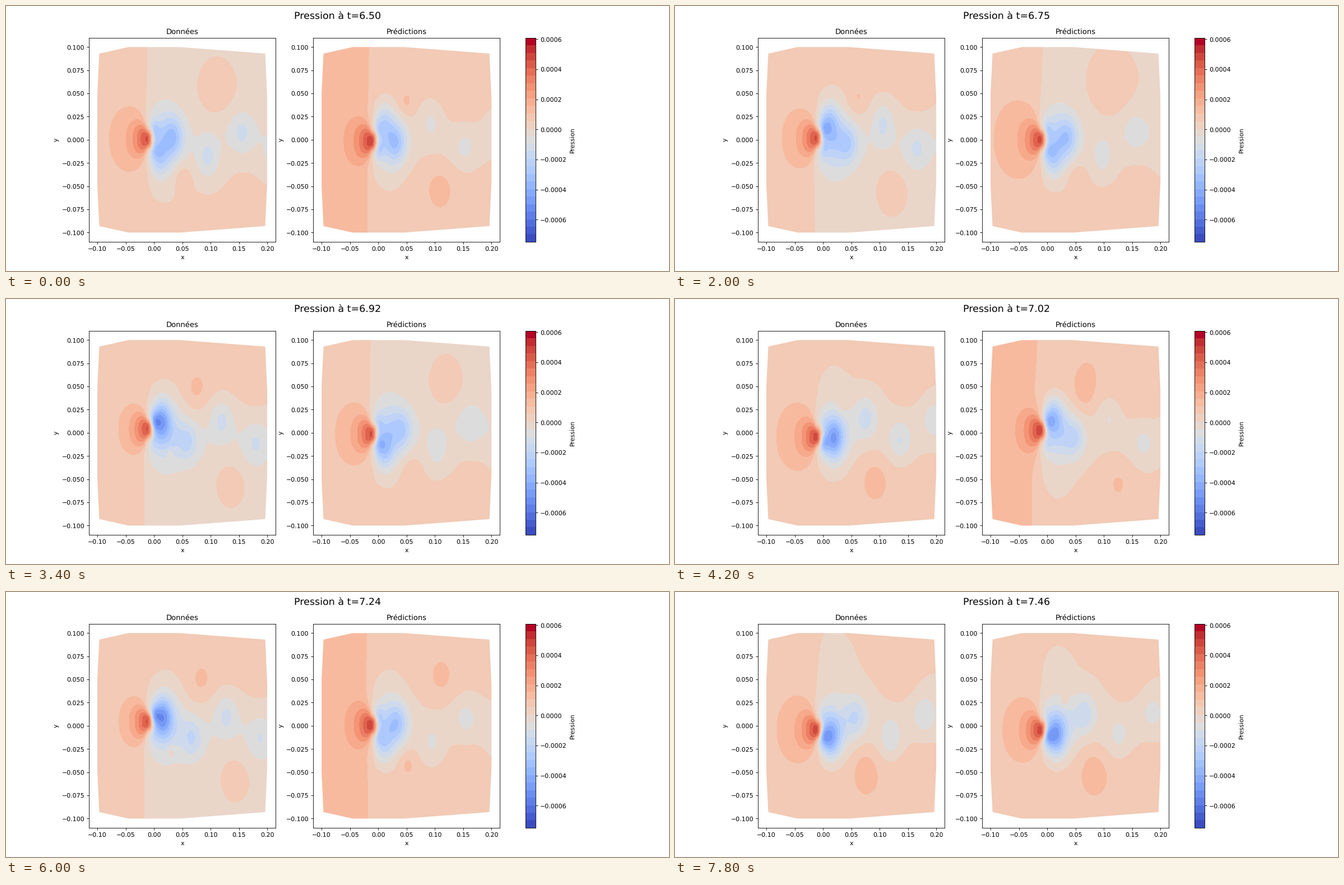
Recreate the animation shown at these times as a matplotlib script. Size 1183x473 px, loop 8 s.

```python
import numpy as np
import matplotlib.pyplot as plt
from matplotlib.animation import FuncAnimation
from matplotlib.cm import ScalarMappable
from matplotlib.colors import Normalize
from matplotlib.patches import Polygon

W, H, DPI = 1183, 473, 78.87
FRAMES, STEP_MS = 40, 200
KEYS = [0, 5, 10, 17, 21, 30, 39]

# Pressures are handled in units of 1e-5, lengths in plot units.
LOW, HIGH = -74.8, 61.0
LEVELS = np.linspace(LOW, HIGH, 20)
X, Y = np.meshgrid(np.linspace(-0.1, 0.2, 241), np.linspace(-0.1, 0.1, 221))

HALF_HULL = [(-0.1, 0.05), (-0.0966, 0.093), (-0.045, 0.1),
             (0.046, 0.1), (0.1965, 0.093), (0.2, 0.045)]
HULL = HALF_HULL + [(x, -y) for x, y in HALF_HULL[::-1]]


def gauss(x, y, sx, sy):
    return np.exp(-((X - x) / sx) ** 2 / 2 - ((Y - y) / sy) ** 2 / 2)


def step(d, width):
    return 0.5 + 0.5 * np.tanh(d / width / 2)


def front(phase):
    """High pressure ahead of the cylinder, in circles through its nose."""
    y0 = -0.0045 * np.sin(2 * np.pi * (phase - 0.03))
    u = -0.012 - X
    up, down = np.maximum(u, 0), np.minimum(u, 0)
    v = 1.08 * (np.hypot(Y - y0, 0.003) - 0.003)
    d = (up ** 2 + v ** 2) / (up + 0.0028)
    return 48 * np.exp(-d / 0.0215 - (down / 0.008) ** 2)


def vortex(age, side, far):
    """One shed vortex; age counts shedding periods, side is +1 above."""
    # It lingers behind the cylinder, then drifts off at a constant speed.
    x = 0.01 + 0.12 * 0.07 * np.log1p(np.exp((age - 0.29) / 0.07))
    y = side * (0.011 + 0.009 * np.cos(2 * np.pi * age) * np.exp(-age ** 2 / 3))
    birth = step(age + 0.1, 0.03)
    fade = np.interp(age, [0.8, 1], [1, far])
    core = 18 * np.exp(-((age - 0.25) / 0.18) ** 2)
    core += 16 * np.exp(-(age / 1.7) ** 2)
    z = -birth * fade * core * gauss(x, y, 0.012, 0.0145)
    # A wide trough pushes the edge of the wake outwards.
    z -= 5 * step(age - 0.6, 0.05) * gauss(x, 1.8 * y, 0.022, 0.017)
    # A ridge of higher pressure travels on the opposite side.
    if age > 0.2:
        ridge = 6.5 * step(1.35 - age, 0.06)
        size = 0.02 * min(age, 1)
        y_ridge = -side * 0.06 * (1 - np.exp(-age / 0.45))
        z += ridge * gauss(x + 0.016, y_ridge, size, size)
    return z


def wake(phase, far):
    phase %= 1
    swing = np.sin(2 * np.pi * (phase - 0.05))
    z = -16 * gauss(0.02, -0.006 * swing, 0.02, 0.021)
    for side in (1, -1):
        z -= (11 - 8 * side * swing) * gauss(0.001, side * 0.012, 0.006, 0.007)
        first = (phase + (0.5 if side > 0 else 0) + 0.3) % 1 - 0.3
        for k in range(3):
            z += vortex(first + k, side, far)
    # The cylinder's rounded back limits the wake.
    return z * step(X + 0.009 - 0.007 * np.exp(-(Y / 0.01) ** 2), 0.0016)


def outer(phase, mean):
    """Slow field: sides rocking in antiphase, a low band along the axis."""
    tilt = 3 * np.sin(2 * np.pi * (phase + 0.08))
    z = mean - tilt * np.tanh(Y / 0.03)
    z -= 5 * np.exp(-(Y / 0.021) ** 2 / 2)
    z -= 5.5 * gauss(0.02, 0, 0.024, 0.042)
    left = mean + 3 + 1.5 * np.cos(4 * np.pi * phase)
    return z + (left - z) * step(-0.016 - X, 0.003)


class Panel:
    def __init__(self, ax, title, phases, means, far):
        self.ax, self.phases, self.means, self.far = ax, phases, means, far
        self.contours = None
        ax.set(title=title, xlabel="x", ylabel="y",
               xlim=(-0.115, 0.215), ylim=(-0.11, 0.11))
        ax.autoscale(False)
        self.hull = Polygon(HULL, transform=ax.transData)

    def draw(self, n):
        phase = self.phases[n]
        z = outer(phase, self.means[n]) + front(phase) + wake(phase, self.far)
        if self.contours:
            self.contours.remove()
        self.contours = self.ax.contourf(
            X, Y, np.clip(z, LOW + 0.01, HIGH - 0.01),
            levels=LEVELS, cmap="coolwarm", zorder=1)
        self.contours.set_clip_path(self.hull)


plt.rcParams["text.hinting"] = "none"
# The tiny surplus keeps the pixel size from being rounded down.
fig, axes = plt.subplots(1, 2, figsize=((W + 1e-6) / DPI, (H + 1e-6) / DPI), dpi=DPI)

frames = np.arange(FRAMES)
data_means = np.interp(frames, KEYS, [4, 10, 4, 4, 6.5, 4, 7])
guess_means = np.interp(frames, KEYS, [8, 7, 5.3, 4.2, 8, 7.5, 7])
guess_phases = np.interp(frames, KEYS, [0.48, 1.29, 2.02, 3.07, 3.62, 5.0, 6.26])
panels = [Panel(axes[0], "Données", frames * 0.159, data_means, 1.0),
          Panel(axes[1], "Prédictions", guess_phases, guess_means, 0.5)]

scale = ScalarMappable(Normalize(LOW * 1e-5, HIGH * 1e-5),
                       plt.get_cmap("coolwarm", 27))
fig.colorbar(scale, ax=axes, label="Pression", ticks=np.arange(-3, 4) * 2e-4)
title = fig.suptitle("", fontsize=16)


def update(n):
    title.set_text(f"Pression à t={6.503 + 0.02465 * n:.2f}")
    for panel in panels:
        panel.draw(n)
    return []


anim = FuncAnimation(fig, update, frames=FRAMES, interval=STEP_MS,
                     init_func=lambda: [], repeat=True, repeat_delay=0, blit=False)
plt.show()
```
